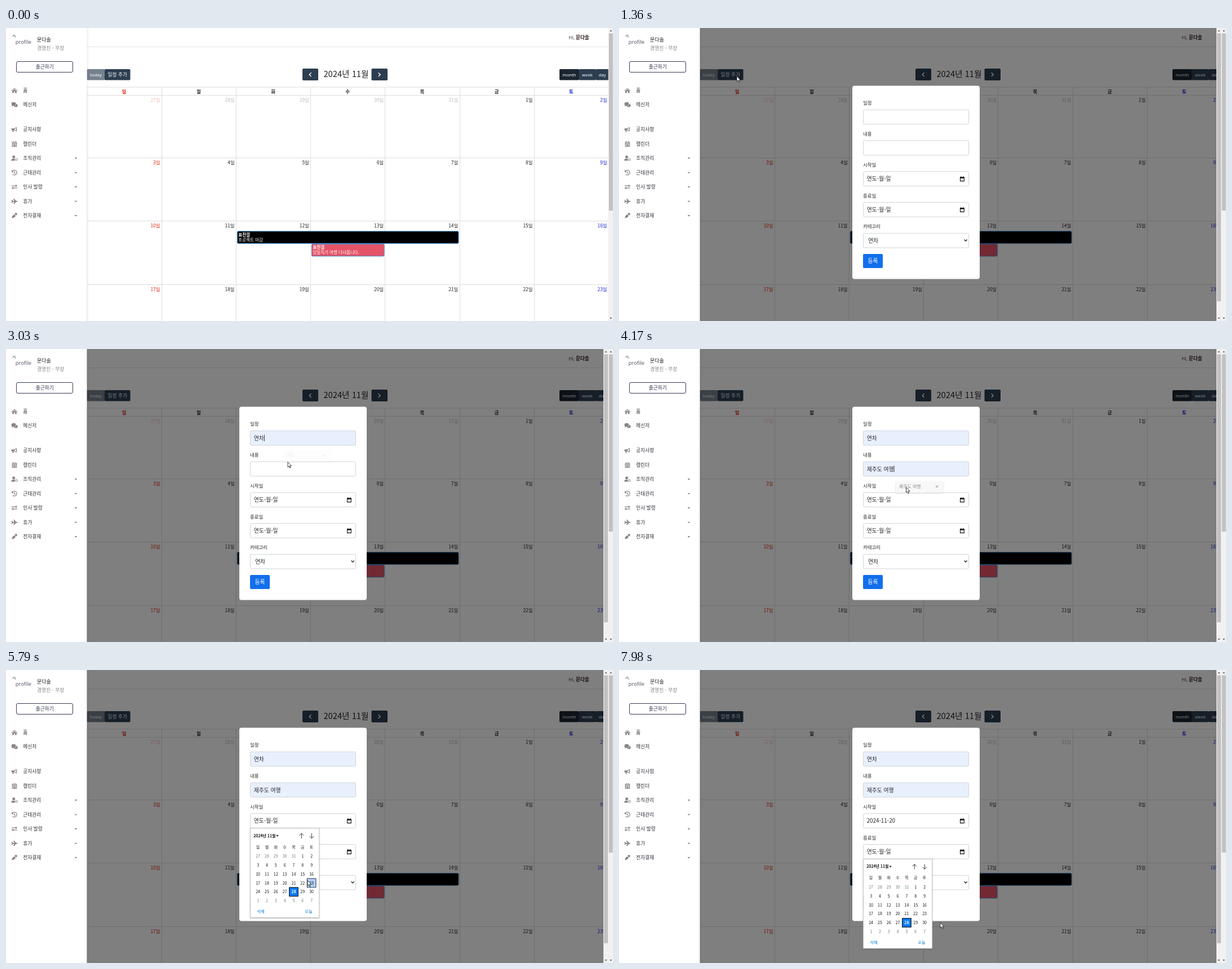
Recreate the animation shown at these times as an HTML page. Size 1077 px wide and 520 px high, loop 8 s.

```html
<!DOCTYPE html>
<html lang="ko">
<head>
<meta charset="utf-8">
<title>캘린더</title>
<style>
html, body { margin: 0; width: 100%; height: 100%; overflow: hidden; background: #fff; }
svg { display: block; width: 1077px; height: 520px; font-family: "Noto Sans CJK KR", "Noto Sans CJK", sans-serif; }
text { white-space: pre; }
.latin { font-family: "Noto Sans", "Open Sans", sans-serif; }
.b { font-weight: 700; }
.m { font-weight: 500; }
.icon { fill: #858585; }
.line { fill: none; stroke: #858585; stroke-width: 1.2; }
</style>
</head>
<body>
<svg id="stage" viewBox="0 0 1077 520"></svg>
<script>
const LOOP = 8000;
const USER = '문다솔', OWNER = '표진결';
const WEEK = [...'일월화수목금토'];
const NAVY = '#2c3e50', NAVY_DARK = '#1a252f';
const range = n => [...Array(n).keys()];

// y is the optical middle of the line
const text = (x, y, str, size, fill = '#222', extra = '') =>
  `<text x="${x}" y="${y + size * 0.365}" font-size="${size}" fill="${fill}" ${extra}>${str}</text>`;
const rect = (x, y, w, h, fill, extra = '') =>
  `<rect x="${x}" y="${y}" width="${w}" height="${h}" fill="${fill}" ${extra}/>`;
const path = (d, extra = '') => `<path d="${d}" ${extra}/>`;
const group = (id, body, extra = '') => `<g id="${id}" ${extra}>${body}</g>`;
const MID = 'text-anchor="middle"', END = 'text-anchor="end"';

/* ---------- sidebar ---------- */
const ICONS = {
  home: path('M-5.5 .2L0-4.6 5.5 .2 4.8 1 0-3.2-4.8 1zM-3.8 1L0-2.3 3.8 1V4.5H1.1V1.6H-1.1V4.5H-3.8z', 'class="icon"'),
  chat: '<ellipse cx="-1.4" cy="-1.2" rx="4" ry="3.2" class="icon"/>' +
    path('M-5 3L-4 .5-1 2zM3.3-1.4C7 0 5.8 2.6 4.8 3.2L5.5 4.6 3.2 4C1 4.6-.8 3.6-1.2 2.6 1.8 2.4 3.6 .8 3.3-1.4z', 'class="icon"'),
  horn: path('M-5.3-2H-.8L4-4.5V3.5L-.8 1.3H-1.8L-1 4.3H-3L-3.8 1.3H-5.3zM4.6-1.4Q6-.5 4.6 .5z', 'class="icon"') +
    path('M.3-1.4L2.8-2.7V1.8L.3 .6z', 'fill="#fff"'),
  calendar: path('M-3.7-3.2H3.7V4.2H-3.7zM-3.7-.9H3.7M-1.8-5V-2.6M1.8-5V-2.6M-2.2 .9H2.2M-2.2 2.6H2.2', 'class="line"'),
  staff: '<circle cx="-1.3" cy="-2.2" r="2.5" class="icon"/>' +
    path('M-5.7 4.6C-5.7 0-1.5 .3 .6 1.2V4.6z', 'class="icon"') +
    '<circle cx="3.2" cy="2.3" r="1.9" class="line" stroke-dasharray="1.2 .4"/>',
  history: path('M-3.8-2.4A4.3 4.3 0 1 1-3.1 3M0-2.4V.4L1.8 1.6', 'class="line"') +
    path('M-4.9-4.6V-.8H-1.2z', 'class="icon"'),
  swap: path('M-5-1.9H2.5M5 1.9H-2.5', 'class="line"') +
    path('M2-4.3L5.2-1.9 2 .3zM-2-.3L-5.2 1.9-2 4.3z', 'class="icon"'),
  plane: path('M-5.5-2.8H-4.3L-3-1H-.2L-2-4.6H-.2L2.6-1H4.2Q6.5 0 4.2 1H2.6L-.2 4.6H-2L-.2 1H-3L-4.3 2.8H-5.5L-4.6 0z', 'class="icon"'),
  pen: path('M-4.8 4.6L-3.6 .4-.6-2.3 2.2 .5-.5 3.3zM.1-3L2.2-4.9Q3.4-5.2 4.6-3.8 5.2-2.8 4.4-1.8L2.8-.2z', 'class="icon"'),
};
const MENU = [
  ['home', '홈', 111], ['chat', '메신저', 136], ['horn', '공지사항', 180.3], ['calendar', '캘린더', 206],
  ['staff', '조직관리', 231], ['history', '근태관리', 256.7], ['swap', '인사 발령', 282],
  ['plane', '휴가', 307.7], ['pen', '전자결재', 333],
];
const sidebar = () =>
  rect(143, 0, 5, 520, 'url(#edge)') + rect(0, 0, 143.5, 520, '#fff') +
  path('M11.5 15.5L13 12.5 17 11.5 17.5 17 15 14.5z', 'fill="#c9ced6"') +
  path('M11.5 15.5L13 12.5M14 12.5L17.5 17.5', 'stroke="#777" stroke-width=".8"') +
  text(16.8, 25, 'profile', 9.3, '#555b66', 'class="latin"') +
  text(55, 21, USER, 9, '#222', 'class="m"') +
  text(55, 36, '경영진 - 부장', 8.8, '#858585') +
  rect(18.5, 59.5, 100, 19, '#fff', 'rx="2.5" stroke="#363b54"') +
  text(68.7, 69, '출근하기', 8.7, '#30344c', MID) +
  MENU.map(([icon, label, y], i) =>
    `<g transform="translate(15 ${y})">${ICONS[icon]}</g>` + text(30.3, y, label, 8.7, '#30323c', 'class="m"') +
    (i > 3 ? path(`M121.6 ${y - 1}h4.6l-2.3 2.4z`, 'fill="#777"') : '')).join('');

/* ---------- calendar page ---------- */
const COL = 132.2, LEFT = 143.5;
const ROWS = [119.5, 230.5, 342.5, 455.5];
const tint = col => col === 0 ? '#e0220f' : col === 6 ? '#1626d8' : '#222';

const dayLabel = (row, col) => {
  const n = row * 7 + col - 4;
  return text(LEFT + COL * (col + 1) - 2.3, ROWS[row] + 8.7, `${n < 1 ? n + 31 : n}일`, 8.4, tint(col),
    `${END} opacity="${n < 1 ? 0.3 : 1}"`);
};
const button = (x, y, w, h, label, fill, size, cls = '') =>
  rect(x, y, w, h, fill, 'rx="1.8"') + text(x + w / 2, y + h / 2 + .2, label, size, '#fff', `${MID} ${cls}`);
const chevron = (x, dir) =>
  path(`M${x - 1.6 * dir} 79.3l${3.4 * dir} 3.4l${-3.4 * dir} 3.4`, 'fill="none" stroke="#fff" stroke-width="1.4"');
const eventBar = (x, y, w, fill, title) =>
  rect(x, y, w, 21.5, fill, 'rx="1.8" stroke="#3788d8"') +
  text(x + 2, y + 6.3, OWNER, 7.5, '#fff', 'class="b"') + text(x + 2, y + 15.3, title, 7.5, '#fff');

const page = () => {
  const latin = 'class="latin"';
  return rect(143, 33, 927, 1, '#e4e4e4') +
    text(998.3, 17, 'Hi,', 8.2, '#444') + text(1011, 17, USER, 8.6, '#2b1414', 'class="b"') +
    `<g opacity=".65">${button(143.5, 73, 32, 19.5, 'today', NAVY, 7.9, latin)}</g>` +
    rect(175, 73, 45.5, 19.5, NAVY, 'id="addButton" rx="1.8"') + text(197.8, 83, '일정 추가', 8.7, '#fff', MID) +
    rect(526, 72, 28, 21, NAVY, 'rx="1.8"') + chevron(540, -1) +
    rect(648.5, 72, 28.5, 21, NAVY, 'rx="1.8"') + chevron(662.3, 1) +
    text(603.5, 81.5, '2024년 11월', 14.7, '#222', MID) +
    button(982, 73, 35, 19.5, 'month', NAVY_DARK, 7.7, latin) +
    button(1046, 73, 24, 19.5, 'day', NAVY, 7.7, latin) + button(1016.5, 73, 30, 19.5, 'week', NAVY, 7.7, latin) +
    path([105, ...ROWS].map(y => `M143 ${y}H1069.5`).join('') +
      range(8).map(i => `M${Math.round(LEFT + COL * i) + (i ? .4 : -.5)} 105V520`).join(''), 'stroke="#ddd" fill="none"') +
    WEEK.map((d, i) => text(LEFT + COL * (i + .5), 112.5, d, 8.4, tint(i), `${MID} class="b"`)).join('') +
    ROWS.map((_, r) => range(7).map(c => dayLabel(r, c)).join('')).join('') +
    eventBar(410.3, 360.8, 392.7, '#000', '프로젝트 마감') +
    eventBar(542.4, 383.4, 128.6, '#e55366', '당일치기 여행 다녀옵니다.');
};
const scrollbar = (x, end) =>
  rect(x, 0, 9, 520, '#f1f1f1') + rect(x + 1, 9.5, 7, end - 9.5, '#c1c1c1') +
  path(`M${x + 2.5} 6h4l-2-2.4zM${x + 2.5} 514h4l-2 2.4z`, 'fill="#555"');

/* ---------- form ---------- */
const FIELD_X = 433.5, PITCH = 54.8;
const fieldY = i => 145.2 + PITCH * i;
const dateIcon = i => {
  const y = fieldY(i) + 9;
  return path(`M605.5 ${y + 1.3}h6.8v6.5h-6.8z`, 'fill="none" stroke="#111" stroke-width="1.1"') +
    rect(605.2, y + .8, 7.4, 2.2, '#111') + path(`M606.8 ${y - .5}v2M611 ${y - .5}v2`, 'stroke="#111"');
};
const form = () =>
  rect(414, 102.5, 226, 343, '#fff', 'rx="4"') +
  ['일정', '내용', '시작일', '종료일', '카테고리'].map((label, i) =>
    text(433, 133.2 + PITCH * i, label, 8.4, '#222') +
    rect(FIELD_X, fieldY(i), 187, 25.6, '#fff', `id="field${i}" rx="2" stroke="#ced4da"`) +
    text(i === 4 ? 442 : 439.7, fieldY(i) + 13, '', 9.8, '#212529', `id="value${i}"`)).join('') +
  dateIcon(2) + dateIcon(3) +
  path('M612.6 375.6l2.5 2.5 2.5-2.5', 'fill="none" stroke="#222" stroke-width="1.4"') +
  rect(433, 401, 35, 25, '#126fec', 'rx="2"') + text(450.5, 413.6, '등록', 9.8, '#fff', MID) +
  rect(0, 0, .8, 11.5, '#111', 'id="caret"');

const suggestion = (i, label) => group(`hint${i}`,
  rect(491, 179 + PITCH * i, 84.5, 21.5, '#f6f6f6', 'rx="2" filter="url(#soft)"') +
  text(497, 189.3 + PITCH * i, label, 7.9, '#555') +
  path(`M562 ${187.2 + PITCH * i}l4.2 4.2m0-4.2l-4.2 4.2`, 'stroke="#555" stroke-width=".9"'));

/* ---------- date picker, drawn from its own top left corner ---------- */
const CELL = 15.83;
const cellBox = (id, col, row, fill, stroke) =>
  rect(6 + CELL * col, 41.8 + CELL * row, 15.6, 15.6, fill, `id="${id}" stroke="${stroke}" stroke-width="1.2"`);
const picker = () =>
  rect(0, 0, 122.5, 158.5, '#fff', 'stroke="#b5b5b5" stroke-width=".8" filter="url(#soft)"') +
  text(6, 13.3, '2024년 11월', 6.9, '#111', 'class="b"') + path('M46 12.2h4.4l-2.2 2.8z', 'fill="#111"') +
  path('M91 18V9.3m-3.8 3.6l3.8-3.8 3.8 3.8M109 9v8.7m-3.8-3.6l3.8 3.8 3.8-3.8', 'fill="none" stroke="#333" stroke-width="1"') +
  WEEK.map((d, i) => text(13.8 + CELL * i, 33.3, d, 7, '#222', MID)).join('') +
  cellBox('hoverCell', 0, 0, '#b4d0f7', '#46566b') + cellBox('todayCell', 4, 4, '#0a7cf5', '#101a28') +
  range(42).map(k => {
    const n = k - 4, inside = n > 0 && n < 31;
    const fill = n === 28 ? '#fff' : inside ? '#111' : '#6b7d7d';
    return text(13.8 + CELL * (k % 7), 49.7 + CELL * (k / 7 | 0), n < 1 ? n + 31 : inside ? n : n - 30, 7, fill,
      `${MID} ${n === 28 ? 'class="b"' : ''}`);
  }).join('') +
  text(12, 147.5, '삭제', 7.2, '#0078d4') + text(97, 147.5, '오늘', 7.2, '#0078d4');

/* ---------- pointer ---------- */
const pointer = () => group('cursor',
  '<circle id="press" cx="0" cy="0" r="6.3" fill="#ffe800" opacity=".68"/>' +
  path('M0 0V9.3L2.2 7.4 3.7 10.8 5.2 10.1 3.7 6.8H6.6z', 'id="arrow" fill="#fff" stroke="#111" stroke-width=".8"') +
  path('M-1.1 6.5V1Q0-.6 1.1 1V4.2L4 4.8Q5.4 5.2 5.2 7L4.4 10V11.8H-1V10.4L-3.6 7Q-3.4 5.4-1.1 7z', 'id="hand" fill="#fff" stroke="#111" stroke-width=".8"') +
  path('M-1.8-5Q0-5 0-4 0-5 1.8-5M0-4V4M-1.8 5Q0 5 0 4 0 5 1.8 5', 'id="beam" fill="none" stroke="#222" stroke-width=".9"'));

document.getElementById('stage').innerHTML =
  `<defs>
    <linearGradient id="edge"><stop stop-color="#000" stop-opacity=".07"/><stop offset="1" stop-color="#000" stop-opacity="0"/></linearGradient>
    <filter id="soft" x="-10%" y="-20%" width="120%" height="140%"><feDropShadow dx="0" dy="1" stdDeviation="1.3" flood-opacity=".28"/></filter>
  </defs>` +
  rect(0, 0, 1077, 520, '#fff') + page() + scrollbar(1068.7, 324) +
  group('modal', rect(143, 0, 917, 520, '#000', 'opacity=".5"') + scrollbar(1060, 485) + form() +
    suggestion(0, '연차') + suggestion(1, '제주도 여행') + group('picker', picker())) +
  sidebar() + pointer();

/* ---------- motion ---------- */
const el = id => document.getElementById(id);
const show = (id, on) => el(id).setAttribute('visibility', on ? 'inherit' : 'hidden');
const between = (t, a, b) => t >= a && t < b;

// time, x, y: the pointer eases from stop to stop
const TRACK = [
  [250, 940, 476], [1030, 206, 83], [1100, 206, 83], [1250, 209, 85.5], [1490, 209, 85.5],
  [1900, 488, 158], [2080, 490, 160], [2500, 499, 188], [2900, 499, 190], [3030, 500, 200.5], [3080, 500, 200.5],
  [3300, 504, 212], [3480, 504, 213], [3820, 508, 243], [4170, 509.5, 245.5], [4250, 509.5, 245.5],
  [4440, 525, 272], [4560, 530, 272], [4860, 607, 268], [5460, 607, 271], [5790, 535, 373.5], [5860, 535, 373.5],
  [6240, 497, 374], [6560, 497, 378], [6780, 497, 378], [7000, 530, 360], [7480, 606, 322],
  [7750, 606, 323], [7970, 570, 448.5], [8000, 570, 448.5],
];
const PRESSES = [[1240, 1360], [2000, 2090], [2800, 2890], [3360, 3450], [4020, 4100], [4880, 4980], [6740, 6820], [7640, 7720]];
const OPEN = 1360;
const HINTS = [[2080, 2880, 3050], [3480, 4100, 4330]];
const PICKERS = [[2, 4980, 6810], [3, 7700, 8000]];

function pointerAt(t) {
  const i = TRACK.findIndex(k => k[0] > t);
  if (i < 1) return TRACK[0].slice(1);
  const [t0, x0, y0] = TRACK[i - 1], [t1, x1, y1] = TRACK[i];
  const u = (t - t0) / (t1 - t0);
  const e = i === 1 ? 1 - (1 - u) ** 2 : u * u * (3 - 2 * u);
  return [x0 + (x1 - x0) * e, y0 + (y1 - y0) * e];
}
const setValue = (i, value) => { el(`value${i}`).textContent = value; };

function render(t) {
  const [x, y] = pointerAt(t);
  const open = t >= OPEN;
  const overButton = !open && between(x, 175, 221) && between(y, 73, 93);
  const overText = open && between(x, 433, 621) &&
    (between(y, 145, 171) || between(y, 200.6, 226));

  show('modal', open);
  el('addButton').setAttribute('fill', overButton ? NAVY_DARK : NAVY);

  setValue(0, t >= 2450 ? '연차' : '');
  setValue(1, t >= 3800 ? '제주도 여행' : '');
  setValue(2, t >= 6780 ? '2024-11-20' : '연도-월-일');
  setValue(3, '연도-월-일');
  setValue(4, '연차');
  el('field0').setAttribute('fill', t >= 2450 ? '#e8f0fe' : '#fff');
  el('field1').setAttribute('fill', t >= 3800 ? '#e8f0fe' : '#fff');

  HINTS.forEach(([from, fade, end], i) => {
    show(`hint${i}`, open && between(t, from, end));
    el(`hint${i}`).setAttribute('opacity', Math.min(1, (end - t) / (end - fade)));
  });

  const row = between(t, 2040, 3400) ? 0 : between(t, 3400, 4900) ? 1 : -1;
  show('caret', open && row >= 0);
  const typed = row === 0 ? (t >= 2820 ? 18.4 : 0) : (t >= 4090 ? 48 : 0);
  el('caret').setAttribute('transform', `translate(${439.6 + typed} ${fieldY(Math.max(row, 0)) + 7})`);

  const current = PICKERS.find(([, from, to]) => between(t, from, to));
  show('picker', !!current);
  show('hoverCell', false);
  if (current) {
    const top = fieldY(current[0]) + 26;
    el('picker').setAttribute('transform', `translate(433.3 ${top})`);
    const col = Math.floor((x - 439.3) / CELL), line = Math.floor((y - top - 41.8) / CELL);
    if (between(col, 0, 7) && between(line, 0, 6)) {
      el('hoverCell').setAttribute('transform', `translate(${CELL * col} ${CELL * line})`);
      show('hoverCell', true);
    }
  }

  show('cursor', t >= 250);
  el('cursor').setAttribute('transform', `translate(${x} ${y})`);
  show('press', t >= 250 && PRESSES.some(([a, b]) => between(t, a, b)));
  const shape = t < 250 ? '' : overButton ? 'hand' : overText ? 'beam' : 'arrow';
  ['hand', 'beam', 'arrow'].forEach(id => show(id, id === shape));
}

const start = performance.now();
function tick() {
  render((performance.now() - start) % LOOP);
  requestAnimationFrame(tick);
}
tick();
</script>
</body>
</html>
```
